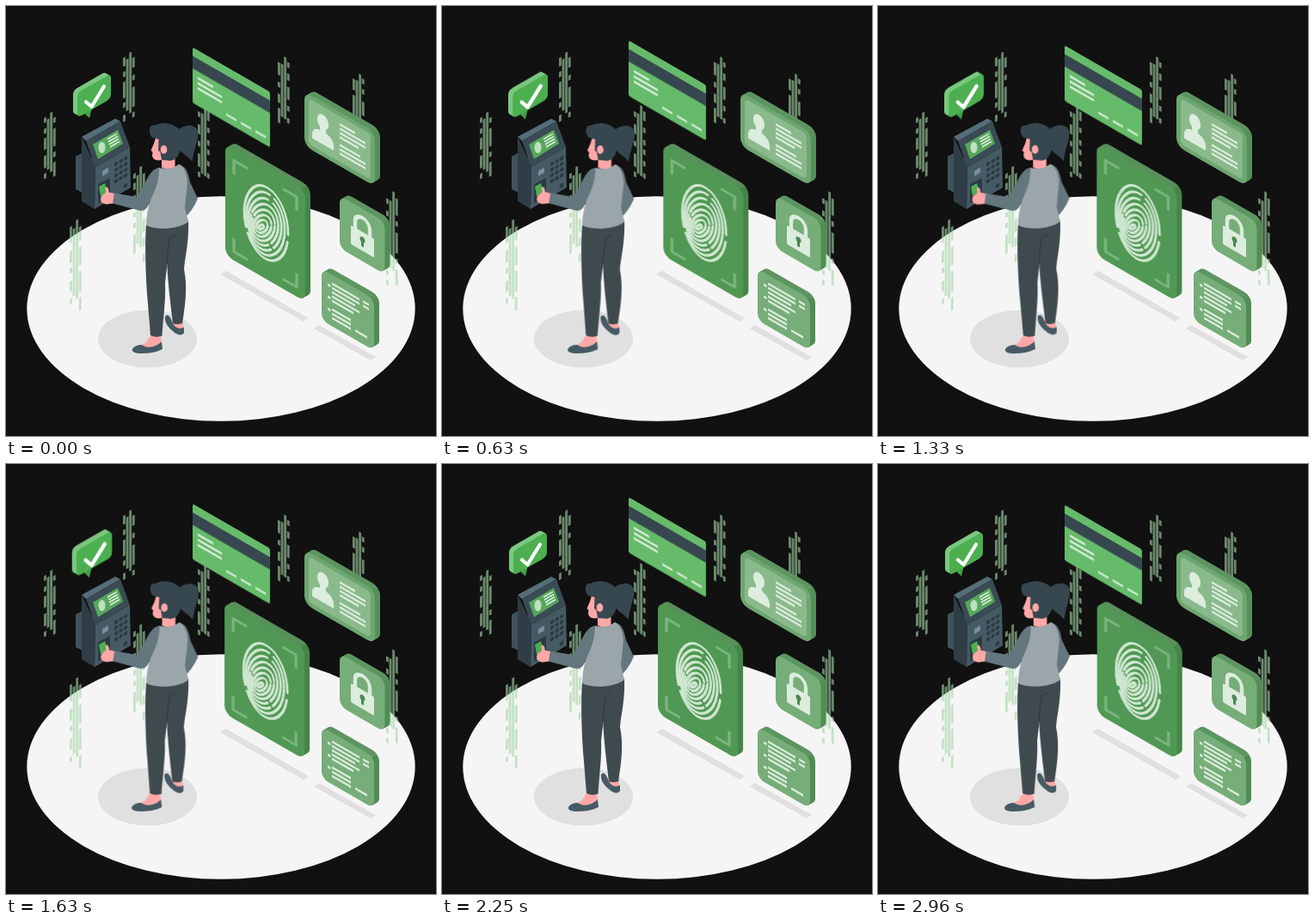
These frames come from a looping animation (500x500 px, 3 s). An HTML page:

```html
<!DOCTYPE html>
<html lang="en">
<head>
<meta charset="utf-8">
<title>Biometric access</title>
<style>
  html, body { margin: 0; width: 100%; height: 100%; overflow: hidden; background: #111; }
  svg { display: block; width: 100vw; height: 100vh; }
</style>
</head>
<body>
<svg id="stage" viewBox="0 0 500 500"></svg>
<script>
const SLOPE = 0.577;
const PALE = '#dcecdd';

const path = (d, fill) => `<path d="${d}" fill="${fill}"/>`;
const rect = (x, y, w, h, fill, r = 0) =>
  `<rect x="${x}" y="${y}" width="${w}" height="${h}" rx="${r}" fill="${fill}"/>`;
const oval = (cx, cy, rx, ry, fill) =>
  `<ellipse cx="${cx}" cy="${cy}" rx="${rx}" ry="${ry}" fill="${fill}"/>`;
const line = (d, color, width) =>
  `<path d="${d}" fill="none" stroke="${color}" stroke-width="${width}" stroke-linejoin="round"/>`;
const group = (id, body) => `<g id="${id}">${body}</g>`;
const repeat = (n, draw) => Array.from({ length: n }, (_, i) => draw(i)).join('');
const mix = (a, b, t) => a + (b - a) * t;

let seed = 11;
const random = () => (seed = seed * 16807 % 2147483647) / 2147483647;

// Places flat artwork on an isometric wall: dir 1 falls to the right, -1 rises.
const wall = (x, y, body, dir = 1) =>
  `<g transform="matrix(1 ${dir * SLOPE} 0 1 ${x} ${y})">${body}</g>`;

// A paragraph of bars, one per width, five units apart.
const bars = (x, y, widths, step = 5) =>
  widths.map((w, i) => rect(x, y + i * step, w, 2.6, PALE)).join('');

// A rounded slab with its thickness going up and to the right.
function slab(id, x, y, w, h, r, face, top, side, body) {
  const shade = `<linearGradient id="${id}Edge"><stop offset=".95" stop-color="${top}"/>
    <stop offset=".95" stop-color="${side}"/></linearGradient>`;
  const edge = repeat(6, i => wall(x + 6 - i, y - (6 - i) * SLOPE, rect(0, 0, w, h, `url(#${id}Edge)`, r)));
  return group(id, shade + edge + wall(x, y, rect(0, 0, w, h, face, r) + body));
}

// Four columns of falling data: long inner bars, broken outer ones.
function stream(x, top, height, dir) {
  const bar = (col, y, h) => wall(x + col * 3.6, top + y, rect(0, 0, 2.9, h, '#a6d7a8'), dir);
  let out = bar(1, height * 0.12, height * 0.7) + bar(2, height * 0.03, height * 0.82);
  for (const col of [0, 3]) {
    let y = height * 0.1;
    while (y < height - 6) {
      const h = Math.min(6 + (random() > 0.4 ? random() * 18 : 0), height - y);
      out += bar(col, y, h);
      y += h + 5 + random() * 4;
    }
  }
  return `<g opacity=".6">${out}</g>`;
}

const streams = () =>
  stream(44, 122, 84, -1) + stream(136, 52, 86, -1) + stream(74, 246, 112, -1) + stream(148, 184, 114, -1)
  + stream(223, 112, 100, 1) + stream(316, 56, 88, 1) + stream(403, 76, 80, 1) + stream(442, 212, 112, 1);

const creditCard = () => wall(217, 48,
  rect(0, 0, 90, 64.5, '#66bb6a', 2) + rect(0, 10, 90, 14.5, '#37474f')
  + bars(6, 31, [18, 28, 28], 6) + repeat(3, i => rect(39 + i * 17, 54, 12, 3, '#c2e4c4')));

// Rings grow from a tilted core low on the left to the upright outline.
function fingerprint() {
  const rings = repeat(8, k => {
    const t = k / 7, cx = mix(-6, 0, t), cy = mix(8, 0, t);
    return `<ellipse cx="${cx}" cy="${cy}" rx="${mix(1.6, 25.5, t)}" ry="${mix(5, 42, t)}"
      transform="rotate(${mix(38, 3, t)} ${cx} ${cy})" pathLength="100"
      stroke-dasharray="${k ? '58 4 35 3' : '100 0'}" stroke-dashoffset="${k * 37}"/>`;
  });
  return `<g transform="translate(47.5 65)" fill="none" stroke="#cfe6d0" stroke-width="2.7"
    stroke-linecap="round">${rings}</g>`;
}

const scanPanel = () => slab('scan', 255, 160, 93, 130, 9, '#509853', '#57905a', '#458549',
  line('M10 30V14H26M67 14H83V30M10 104V120H26M67 119H83V103', '#7ab57d', 3.4) + fingerprint());

const idCard = () => slab('idCard', 347, 99.5, 82, 63, 9, '#6ea671', '#5c9560', '#568f59',
  rect(5, 5, 72, 53, '#8aba8c', 5) + oval(21.5, 23, 6.6, 8.5, PALE)
  + path('M9 49V44Q9 36 18 34V27H25V34Q34 36 34 44V49Z', PALE)
  + bars(41, 13, [18, 30, 30, 22]) + bars(41, 37, [24, 30, 30]));

const lockPanel = () => slab('lock', 388, 220.5, 52.5, 61, 8, '#76ad78', '#5c9560', '#508d54',
  line('M18 30V19A8.5 8.5 0 0 1 35 19V30', PALE, 4.4) + rect(13, 27, 27, 22, PALE, 1.5)
  + oval(26.5, 36, 3, 3.4, '#4b8550') + rect(25, 36, 3, 8, '#4b8550'));

const codePanel = () => slab('code', 367, 305.5, 61, 60, 8, '#76ad78', '#5c9560', '#508d54',
  bars(7, 13, [3.5, 3.5, 3.5], 14) + bars(12, 9, [32, 32, 27, 32, 25])
  + bars(12, 39, [22, 22, 22]) + bars(39, 48, [14]) + bars(48, 9, [7, 7]));

function bubble() {
  const layer = (i, fill) => wall(83 - i, 101 - i * SLOPE, rect(0, 0, 39, 29, fill, 5), -1);
  return repeat(5, i => layer(5 - i, '#7cc880'))
    + path('M88 122L97 130.5L100 118Z', '#43a047') + layer(0, '#4caf50')
    + `<g stroke-linecap="round">${line('M93 111.5L99.5 117L114 93.5', '#fff', 4.2)}</g>`;
}

function terminal() {
  const dark = '#2b3a42';
  const keys = repeat(12, i => rect(23 + i % 3 * 5.6, 9 + Math.floor(i / 3) * 6.6, 4, 4, dark, 1));
  return path('M81 175L90 170L103 178V224L81 213Z', '#3f525c')
    + path('M88 152L104 186L103 236L88 227Z', '#2f3e46')
    + path('M88 152L127 131L133 134L93 157Z', '#546e7a')
    + path('M93 157L133 134L144 164L104 187Z', '#3a4b54')
    + path('M104 187L144 164L145 211L103 236Z', '#455a64')
    + path('M101 161L130 144L136 160L107 178Z', '#58a65c')
    + oval(111.5, 164.5, 4, 6.6, '#bfe0c1')
    + wall(118, 154, repeat(4, i => rect(i, i * 3.6, 11, 1.7, '#e4f3e5')), -1)
    + wall(103, 187, keys + oval(36, 42.5, 2.4, 2.6, dark) + rect(9, 10, 7, 6, '#78909c', 1)
      + rect(4, 23, 14, 22, dark, 1), -1)
    + path('M108 210L115 206L118 216L110 221Z', '#4caf50');
}

function woman() {
  const skin = '#ffa8a7', hair = '#37474f', sleeve = '#64767e', pants = '#3f4a4f', shoe = '#455a64';
  const feet =
    path('M189 360L194 367H205.500L206.500 375Q196 378 189 366Z', skin)
    + path('M185 361C188 357 191 361 193 367C195 373 201 377 207 373.500V380C205 384 199 383 194 378C189 374 184 368 185 361Z', shoe)
    + path('M168.500 382H180L181 393L166 398L153 397L163 391Z', skin)
    + path('M147 399Q150 394 158 394C163 398 173 398 181 390L182 399C174 403 166 404 158 404C150 404 146 402 147 399Z', shoe);
  const legs =
    path('M186 255L212 249C213 275 208 292 207 306C211 325 209 345 205 369Q199 371 194 369C191 345 188 320 187 296Z', pants)
    + path('M163 253C161 285 163 320 164.500 340L168 383Q175 386 181.500 383.500C183 360 186 340 185 322C187 305 189 290 190 272L206 252Z', pants)
    + line('M187 300Q188 283 190 270L198 266', '#2e383d', 1);
  const body =
    path('M201 184C211 187 212 196 214 205L223 224Q217 238 207 247L205 205Z', sleeve)
    + path('M178 188Q190 192 201 184C207 187 210 194 211 205L208 234L212 251C200 260 175 261 163 255C163 240 168 225 170 215C171 200 172 192 178 188Z', '#9ba6ab')
    + path('M126 218L119.500 216.500C120 212 117 208.500 115.500 211.500L116 217L111 220.500C109 226 110 230 117 230.500L125 229.500Z', skin)
    + path('M178 188C170 189 166 197 161 207L152 222L126 217.500L124 229.500L156 238C162 238.500 165 234 167 228C173 215 178 205 178 188Z', sleeve);
  const head =
    path('M175 150L172 160L168.500 168L170.500 170L170 174Q171 181 181 179V188Q189 191 196.500 187V174L192 158Z', skin)
    + path('M170 153C165 148 166 137 173 139C181 134 194 136 201 143C207 150 205 165 200 174C197 179 192 181 188 179.500L181 179L179.500 170L177 168L177.500 155Z', hair)
    + path('M199 145C206 138 219 136 223 145C225 154 219 163 216.500 181C212 174 206 173 202 167Z', hair)
    + oval(183.5, 167, 3.8, 5, skin);
  return feet + legs + body + head;
}

document.getElementById('stage').innerHTML =
  oval(250, 352, 225.7, 130.7, '#f5f5f5') + oval(164.5, 387, 57.5, 33.5, '#e0e0e0')
  + path('M249 312L256 308L352 363L346 367Z', '#e0e0e0')
  + path('M358 375L364 371L430 408L424 412Z', '#e0e0e0')
  + streams() + group('card', creditCard()) + idCard() + lockPanel() + codePanel() + scanPanel()
  + terminal() + group('bubble', bubble()) + group('woman', woman());

// Linear motion through evenly spaced poses; swing plays there and back.
function move(id, poses, options) {
  document.getElementById(id).animate({ transform: poses }, { iterations: Infinity, ...options });
}
const swing = { duration: 750, direction: 'alternate' };
const about = (x, y, turn) => `translate(${x}px, ${y}px) ${turn} translate(${-x}px, ${-y}px)`;
const tilt = deg => about(166, 270, `rotate(${deg}deg)`);
const beat = size => about(100, 104, `scale(${size})`);

move('card', ['translateY(0px)', 'translateY(-9.5px)'], swing);
move('scan', [0, -1, 2, -4, 4, -4].map(x => `translateX(${x}px)`), swing);
move('woman', [tilt(-1), tilt(1)], { ...swing, iterationStart: 0.5 });
// Two beats, then a rest: one pose every 300 ms.
move('bubble', [1, 1.1, 1.05, 1, 1, 1.1, 1, 1, 1, 1, 1].map(beat), { duration: 3000 });
</script>
</body>
</html>
```
